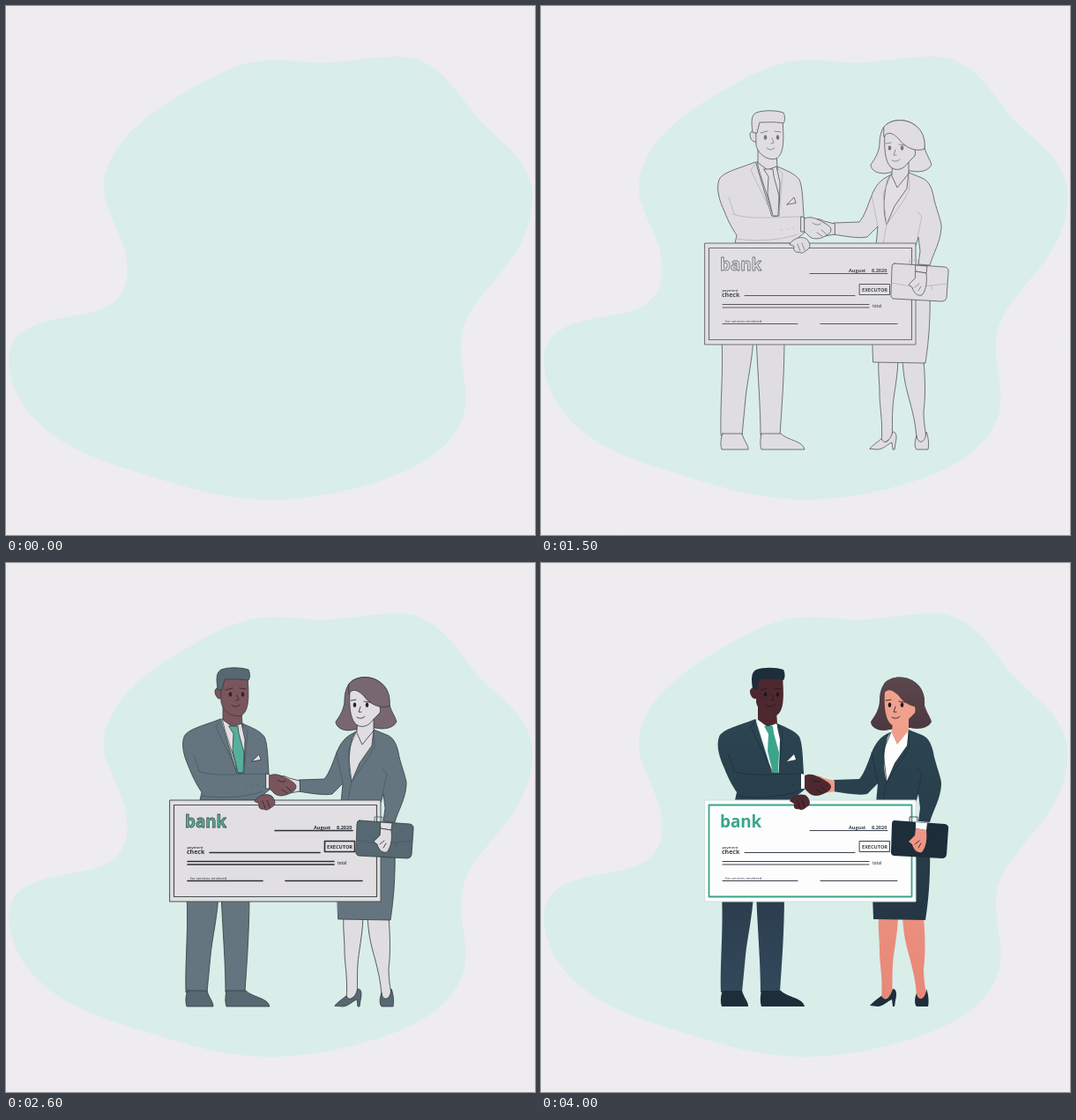
An HTML page with a canvas for the animation above (7 s loop, 600x600 px).

```html
<!DOCTYPE html>
<html lang="en">
<head>
<meta charset="utf-8">
<title>Handshake with a check</title>
<style>
html, body { margin: 0; width: 100%; height: 100%; overflow: hidden; background: #eeecef; }
canvas { display: block; }
</style>
</head>
<body>
<canvas id="stage" width="600" height="600"></canvas>
<script>
const ctx = document.getElementById('stage').getContext('2d');
const LOOP = 7000, SLOPE = 0.42, FIRST = 219, LAST = 690;

const blob = new Path2D('M370 64C400 61 440 54 462 59C495 69 511 97 532 124C558 154 589 166 597 208C600 250 580 280 560 304C530 340 515 355 516 393C518 420 523 430 521 453C515 500 465 526 420 540C380 552 340 560 300 560C240 560 190 541 150 529C90 511 40 490 15 445C2 420 -1 395 10 378C30 352 80 355 110 343C140 328 140 305 135 278C128 250 108 225 111 200C116 160 150 132 180 112C220 87 255 66 290 62C320 59 345 66 370 64Z');

// Material key and shape, back to front. Keys: J jacket, T trousers, K dark,
// B brown skin, H brown hair, G green, P pink skin, W white, C crease, D face detail.
const shapes = list => list.map(([key, d]) => [key, new Path2D(d)]);

const people = shapes([
  // man: legs and shoes
  ['T', 'M205 375L241 375C240 400 234 425 232 445L228 487L204 487C203 450 207 420 205 375Z'],
  ['T', 'M244 375L276 375C276 420 273 455 271 487L249 487C249 455 246 420 244 375Z'],
  ['K', 'M206 485L228 485C230 493 235 497 235 503L205 503C203 497 204 490 206 485Z'],
  ['K', 'M250 485L272 485C280 493 297 493 299 503L250 503C248 497 249 490 250 485Z'],
  // man: head
  ['B', 'M246 160L246 178C252 187 262 188 268 183L267 168Z'],
  ['J', 'M243 177C226 184 206 188 202 197C198 208 203 222 208 233C213 246 218 254 222 260L220 269L284 269L299 257L298 238C297 225 297 205 293 197C288 190 277 186 268 182L267 238L262 238Z'],
  ['W', 'M245 177L257 186L267 182L271 200L270 238L263 238C258 216 249 196 245 177Z'],
  ['G', 'M253 185L263 185L264 193L270 215L269 238L263 238L257 213L258 194Z'],
  ['W', 'M279 225L287 217L289 223Z'],
  ['C', 'M244 178L238 186L263 238M268 183L274 190L270 238M218 236C235 243 270 239 297 239M213 217L219 236M222 264C245 268 275 265 291 259M272 254h1M279 253h1M285 252h1'],
  ['B', 'M245 143C239 139 235 144 238 150C240 155 244 155 246 152Z'],
  ['B', 'M244 129L274 129C276 155 275 168 267 173C257 176 246 168 244 158Z'],
  ['K', 'M240 143C238 129 239 124 244 121C252 118 266 118 275 121C277 125 277 130 275 133C266 131 255 132 248 132L245 144Z'],
  ['D', 'M249 144L257 142M265 142L272 143M262 150L264 155L261 156M256 161Q260 165 265 161'],
  // woman: legs, shoes, skirt
  ['P', 'M383 402L405 402C404 425 400 440 399 455C398 470 399 480 398 490L386 497C388 470 384 455 384 440C384 425 382 415 383 402Z'],
  ['P', 'M410 402L434 402C436 425 436 445 434 460C434 475 437 485 437 494L426 495C426 475 420 455 416 440C412 425 411 415 410 402Z'],
  ['K', 'M373 502C376 498 381 495 386 491C391 499 396 492 399 483C403 483 404 488 402 496L401 503L399 503L398 495C393 497 388 503 382 503Z'],
  ['K', 'M426 488C427 497 436 497 437 483C440 490 440 500 439 503L426 503C423 500 424 492 426 488Z'],
  ['J', 'M374 320L441 320C442 360 439 385 436 405L377 404Z'],
  // woman: jacket and blouse
  ['J', 'M396 192C384 197 379 205 375 215C370 228 367 238 361 245L332 246L331 259C345 261 360 264 370 262L382 250L380 272L425 272L428 262L430 278L428 293L441 294C445 280 453 268 454 252C455 247 450 235 446 220C444 207 440 198 432 195L417 189Z'],
  ['W', 'M397 191L417 188L415 207L401 227L392 248C388 235 388 215 393 198Z'],
  ['C', 'M397 192L388 213L392 248L411 221L418 208L417 190M427 233L432 239L427 262M375 215L382 250M392 248L388 269'],
  // woman: head
  ['H', 'M389 137C395 129 410 127 421 133C433 140 435 152 435 161C437 169 441 173 443 180C439 188 428 189 419 187L395 189C384 192 374 187 374 180C379 173 384 165 384 155C384 148 386 141 389 137Z'],
  ['P', 'M399 178L417 176L417 190L404 206L398 193Z'],
  ['P', 'M390 146C389 160 390 175 396 182C402 188 411 186 417 177L424 170C426 163 422 158 418 156L400 140Z'],
  ['H', 'M389 148C394 141 400 145 406 151C413 161 426 166 435 162C436 150 433 140 421 133C410 127 395 129 389 137Z'],
  ['D', 'M391 156L397 155M406 157L413 158M402 163L400 169L403 169M398 175Q403 178 407 174'],
  // handshake
  ['W', 'M295 239L299 240L299 256L295 256Z'],
  ['P', 'M333 247L321 244C314 240 309 241 308 246L316 262L333 259Z'],
  ['B', 'M299 241C306 238 311 241 316 243C321 246 328 249 329 253C329 257 326 259 324 260C318 264 309 266 304 261L299 256Z'],
  ['D', 'M308 246Q313 250 317 247M313 257L319 261M318 254L324 259']
]);

const front = shapes([
  ['B', 'M282 270C286 263 297 260 302 265C306 270 306 275 301 277C298 280 295 281 292 279C288 280 286 277 287 273Z'],
  ['D', 'M291 270L294 278M296 269L299 277'],
  ['C', 'M418 293V288H427V293'],
  ['K', 'M401 292L458 296Q463 297 462 302L460 331Q459 335 455 335L400 332Q396 331 397 326L398 296Q398 292 401 292Z'],
  ['C', 'M398 314L424 319L460 315M443 317V322'],
  ['W', 'M425 294L438 295L437 303L425 301Z'],
  ['P', 'M425 301L437 303C438 313 437 322 432 328C427 329 423 326 421 319L417 316L424 309Z'],
  ['D', 'M424 319L429 315M428 323L431 318']
]);

const eyes = [[254.5, 149], [268.5, 149], [395.5, 161], [409.5, 161]];

const grad = (y0, y1, a, b) => {
  const g = ctx.createLinearGradient(0, y0, 0, y1);
  g.addColorStop(0, a);
  g.addColorStop(1, b);
  return g;
};

const grey = '#dfdde0';
const sketch = {
  J: grey, T: grey, K: grey, B: grey, H: grey, G: grey, P: grey, W: '#e1dfe2',
  C: '#b4b3b7', D: '#76767a', ink: '#56565b', text: '#4a4a4f', frame: '#707075',
  edged: 'JTKBHGPW', width: 0.8, rule: 0.9
};
const pencil = { ...sketch, text: '#85858a', frame: '#c3bec4' };
const faint = { ...pencil, C: '#d2d1d4', D: '#c0bfc3', ink: '#cfcdd1', text: '#b5b4b8' };
const tint = {
  ...sketch, J: '#64757f', T: '#64757f', K: '#566872', B: '#7a555b', H: '#78676e', G: '#55b09b',
  C: '#4b5b66', D: '#2b2429', ink: '#353a40', text: '#2c3036', frame: '#45524f', rule: 1.6
};
const deep = {
  ...tint, J: '#3d515d', T: '#43586a', K: '#2c3d4a', B: '#593239', H: '#5f4b52', G: '#3aa48a',
  C: '#2b3c48', D: '#21171c', edged: 'PW'
};
const bright = {
  ...deep, P: '#ee9a86', W: '#fdfdfd', text: '#4a525a', frame: '#3aa48a', edged: '', rule: 1
};
const full = {
  ...bright, J: grad(180, 400, '#2c4551', '#253745'), T: grad(383, 487, '#2a3e4e', '#33485b'),
  K: '#1e2d3a', B: '#4d292f', H: grad(130, 190, '#5c474d', '#4b383f'), G: '#3aa58b',
  P: grad(150, 490, '#f0a28d', '#e98878'), C: '#1f2f3b', text: '#39424c'
};

function drawShape(style, [key, path]) {
  ctx.lineWidth = style.width;
  if (key === 'C' || key === 'D') {
    ctx.strokeStyle = style[key];
    ctx.stroke(path);
    return;
  }
  ctx.fillStyle = style[key];
  ctx.fill(path);
  if (style.edged.includes(key)) {
    ctx.strokeStyle = style.ink;
    ctx.stroke(path);
  }
}

function write(text, x, y, size, weight = 400) {
  ctx.font = `${weight} ${size}px "Open Sans", sans-serif`;
  ctx.fillText(text, x, y);
}

function rule(x0, x1, y) {
  ctx.beginPath();
  ctx.moveTo(x0, y);
  ctx.lineTo(x1, y);
  ctx.stroke();
}

function drawCheck(style) {
  const edged = style.edged.includes('W');
  ctx.fillStyle = style.W;
  ctx.fillRect(186, 269, 239, 115);
  ctx.lineWidth = 1;
  ctx.strokeStyle = edged ? style.frame : '#d5dfdf';
  ctx.strokeRect(186, 269, 239, 115);

  ctx.strokeStyle = style.frame;
  ctx.lineWidth = edged ? 1.2 : 1.8;
  ctx.strokeRect(190.5, 274.5, 230, 104);
  ctx.fillStyle = style.G;
  write('bank', 203, 300, 18.8, 700);
  if (edged) {
    ctx.lineWidth = 0.8;
    ctx.strokeText('bank', 203, 300);
  }

  ctx.strokeStyle = ctx.fillStyle = style.text;
  ctx.lineWidth = style.rule;
  [[305, 393, 303.5], [231, 356, 328.5], [206, 372, 338.5], [206, 372, 342],
    [206, 291, 360.5], [317, 404, 360.5]].forEach(r => rule(...r));
  ctx.strokeRect(361.5, 315.5, 34, 12);
  write('August', 349, 301.5, 5.5, 700);
  write('8,2020', 375, 301.5, 5.5, 700);
  write('payment', 205.5, 323.5, 4.2, 600);
  write('check', 205, 330, 7, 700);
  write('EXECUTOR', 364, 323.7, 5.6, 700);
  write('total', 376, 342, 4.5, 600);
  write('for services rendered', 209, 359, 4.2);
}

function paint(style) {
  ctx.fillStyle = '#eeecef';
  ctx.fillRect(0, 0, 600, 600);
  ctx.fillStyle = '#d9eee9';
  ctx.fill(blob);
  if (!style) return;
  people.forEach(s => drawShape(style, s));
  ctx.fillStyle = style.D;
  for (const [x, y] of eyes) {
    ctx.beginPath();
    ctx.ellipse(x, y, 1.8, 2.8, 0, 0, 7);
    ctx.fill();
  }
  drawCheck(style);
  front.forEach(s => drawShape(style, s));
}

// Each pass sweeps a slanted edge from the upper left to the lower right.
const passes = [
  [faint, 0, 800], [pencil, 0, 1400], [sketch, 800, 1600], [tint, 1600, 2400],
  [deep, 2600, 3200], [bright, 2600, 4160], [full, 3200, 4000]
];

function sweep(style, start, end, t) {
  const p = Math.min(1, (t - start) / (end - start));
  if (p <= 0) return;
  const k = p < 1 ? FIRST + (LAST - FIRST) * p : 1000;
  ctx.save();
  ctx.beginPath();
  ctx.moveTo(0, -400);
  ctx.lineTo(600, -400);
  ctx.lineTo(600, k - 600 * SLOPE);
  ctx.lineTo(0, k);
  ctx.clip();
  paint(style);
  ctx.restore();
}

ctx.lineJoin = ctx.lineCap = 'round';
const begin = performance.now();

function frame() {
  const now = Math.max(0, performance.now() - begin) % LOOP;
  const t = Math.floor(now / 100) * 100;
  paint();
  passes.forEach(([style, start, end]) => sweep(style, start, end, t));
  requestAnimationFrame(frame);
}
frame();
</script>
</body>
</html>
```
